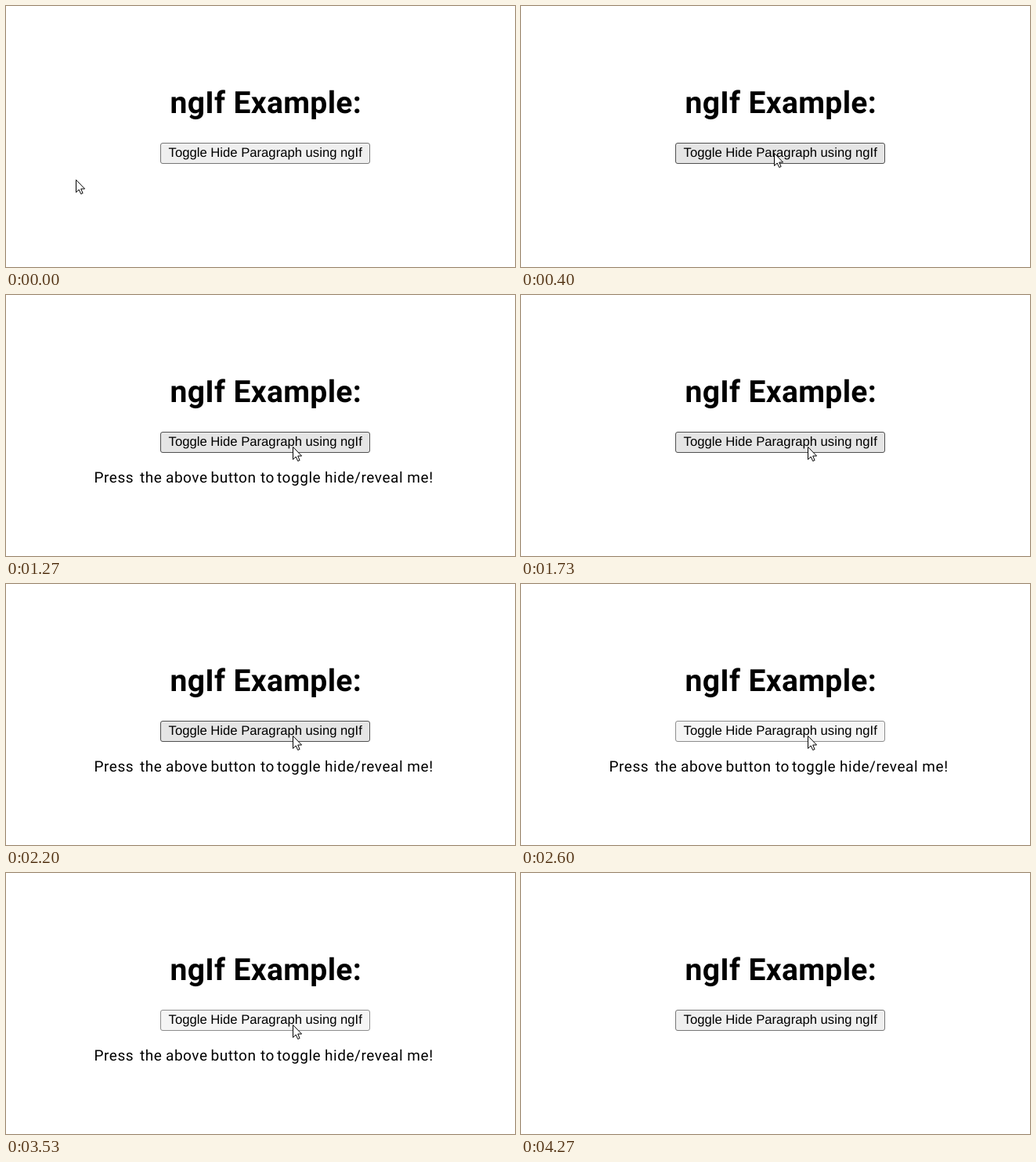
Animation of 650 by 334 pixels, one loop 4.67 s. Source, as an HTML page:

```html
<!DOCTYPE html>
<html lang="en">
<head>
<meta charset="utf-8">
<title>ngIf Example</title>
<style>
  html, body { margin: 0; width: 100%; height: 100%; overflow: hidden; background: #fff; }
  svg { display: block; width: 650px; height: 334px; }
  text { text-rendering: geometricPrecision; }
  .heading { font: 700 39px Roboto, sans-serif; letter-spacing: .35px; }
  .label { font: 16.66px "Liberation Sans", Arial, sans-serif; }
  .paragraph { font: 19px Roboto, sans-serif; letter-spacing: .55px; }
</style>
</head>
<body>
<svg viewBox="0 0 650 334">
  <text class="heading" x="209.5" y="136.5">ngIf Example:</text>
  <rect id="button" x="197.5" y="175.5" width="267" height="26" rx="2.5"/>
  <text class="label" x="207.6" y="193">Toggle Hide Paragraph using ngIf</text>
  <text id="paragraph" class="paragraph" y="240"><tspan x="112.5">Press </tspan><tspan x="171">the </tspan><tspan x="204">above </tspan><tspan x="261.5">button </tspan><tspan x="325">to </tspan><tspan x="346">toggle </tspan><tspan x="407">hide/reveal me!</tspan></text>
  <path id="cursor" d="M.5 .5V16.5L4.2 13L6.7 18.5L9.1 17.5L6.7 12H11.6Z" fill="#fff" stroke="#000"/>
</svg>
<script>
const LOOP = 4670, STEP = 1000 / 15;
const FIRST_PRESS = 17, PRESS_LENGTH = 2, CLICK_PERIOD = 7, CLICKS = 6;
const LAST_RELEASE = FIRST_PRESS + PRESS_LENGTH + (CLICKS - 1) * CLICK_PERIOD;

const [button, paragraph, cursor] =
  ["button", "paragraph", "cursor"].map(id => document.getElementById(id));

const looks = {
  idle: ["#efefef", "#767676"],
  hover: ["#e5e5e5", "#4f4f4f"],
  active: ["#f5f5f5", "#8d8d8d"]
};

// Cursor tip: step, x, y
const route = [
  [0, 89, 222], [8, 366, 182], [14, 366, 182],
  [17, 366, 194], [54, 366, 194], [64, 510, 336]
];

const ease = p => p * p * (3 - 2 * p);

function cursorAt(step) {
  const next = route.findIndex(stop => stop[0] > step);
  if (next < 0) return route.at(-1).slice(1);
  const [s0, x0, y0] = route[next - 1], [s1, x1, y1] = route[next];
  const p = ease((step - s0) / (s1 - s0));
  return [Math.round(x0 + (x1 - x0) * p), Math.round(y0 + (y1 - y0) * p)];
}

function render(time) {
  const step = Math.floor((time % LOOP + 4) / STEP);
  const [x, y] = cursorAt(step);
  const over = x >= 197 && x < 465 && y >= 175 && y < 202;
  const sincePress = step - FIRST_PRESS;
  const pressed = sincePress >= 0 && step < LAST_RELEASE &&
    sincePress % CLICK_PERIOD < PRESS_LENGTH;
  const clicks = Math.min(CLICKS,
    Math.max(0, Math.floor((sincePress - PRESS_LENGTH) / CLICK_PERIOD) + 1));

  const [fill, stroke] = looks[pressed ? "active" : over ? "hover" : "idle"];
  button.setAttribute("fill", fill);
  button.setAttribute("stroke", stroke);
  paragraph.setAttribute("visibility", clicks % 2 ? "visible" : "hidden");
  cursor.setAttribute("transform", `translate(${x} ${y})`);
}

const start = performance.now();
function tick() {
  render(performance.now() - start);
  requestAnimationFrame(tick);
}
tick();
</script>
</body>
</html>
```
